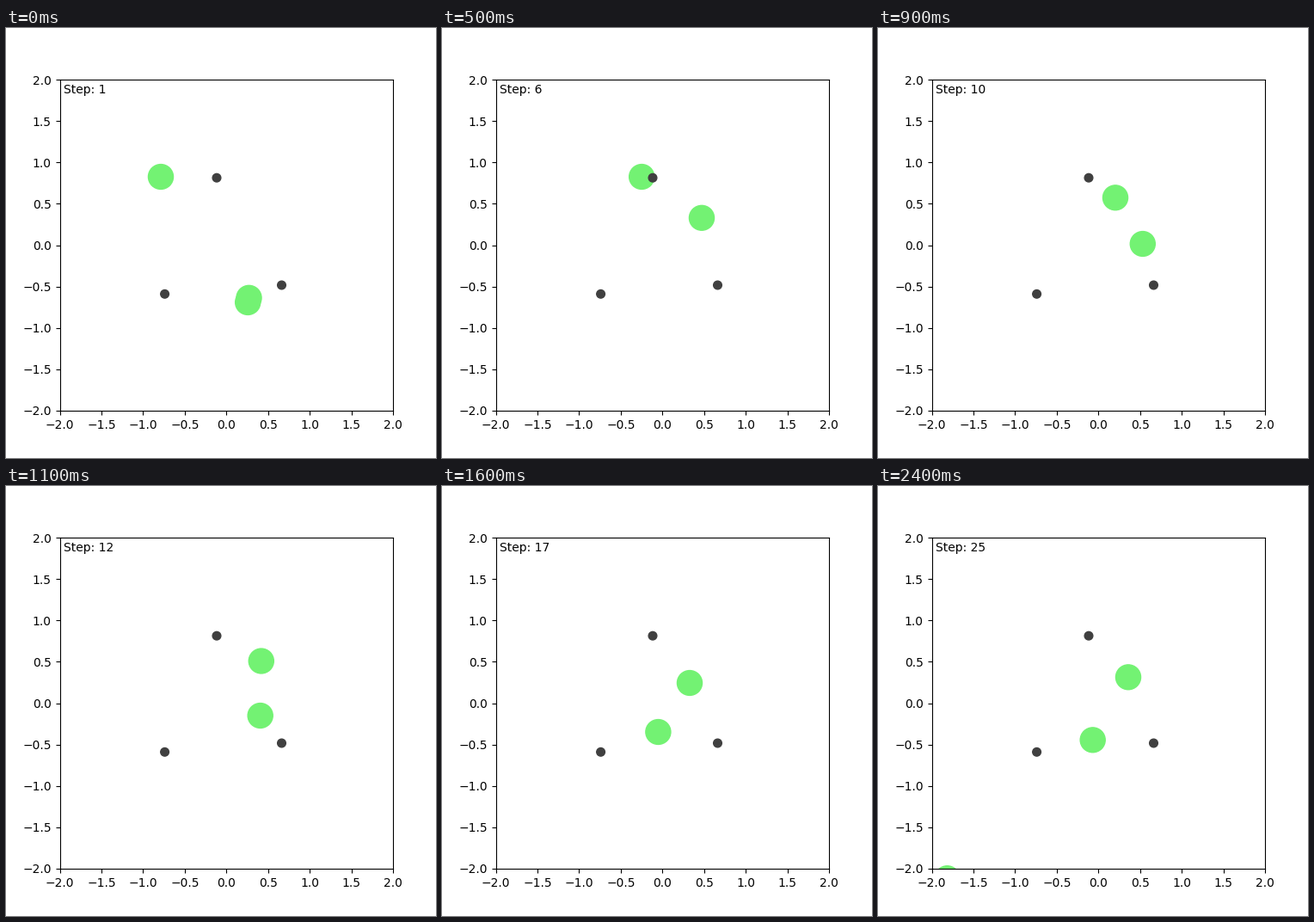
Write a matplotlib script that moves like this. It is 500 px wide and 500 px high and loops after 2.5 s.

```python
import numpy as np
import matplotlib.pyplot as plt
from matplotlib.animation import FuncAnimation

STEPS = 25
INTERVAL = 100
GREEN = (0.45, 0.95, 0.45)
GREY = (0.25, 0.25, 0.25)

# Waypoints: step, x, y in stage pixels (y down)
PATHS = [
    [(0, 180, 173), (5, 232.2, 173), (9, 276, 197.3), (11, 296.8, 203.5),
     (16, 288, 229), (20, 288, 230.2), (24, 291, 222.3)],
    [(0, 282.5, 313.8), (5, 302, 220.8), (9, 307.8, 251), (11, 295.7, 267),
     (16, 251.4, 286), (20, 243.6, 289), (24, 249.7, 295.3)],
    # leaves through the bottom edge and returns at the end
    [(0, 281.2, 319), (5, 250, 463), (12, 160, 600), (24, 80.5, 456.2)],
]
LANDMARKS = [(245, 174.2), (184.6, 309.3), (320.5, 299)]


def to_data(x, y):
    """Stage pixels to axis units."""
    return (x - 62.5) / 96.875 - 2, 2 - (y - 60) / 96.25


def end_slope(d0, d1, h0, h1):
    slope = d0 + (d0 - d1) * h0 / (h0 + h1)
    return slope if slope * d0 > 0 else 0


def slopes(keys, vals):
    """Shape-preserving slopes: zero at turning points, no overshoot."""
    h = np.diff(keys)
    d = np.diff(vals) / h
    m = np.zeros(len(keys))
    for i in range(1, len(d)):
        if d[i - 1] * d[i] > 0:
            w0, w1 = 2 * h[i] + h[i - 1], h[i] + 2 * h[i - 1]
            m[i] = (w0 + w1) / (w0 / d[i - 1] + w1 / d[i])
    m[0] = end_slope(d[0], d[1], h[0], h[1])
    m[-1] = end_slope(d[-1], d[-2], h[-1], h[-2])
    return m


def smooth(t, keys, vals):
    """Cubic Hermite curve through the waypoints."""
    m = slopes(keys, vals)
    i = min(np.searchsorted(keys, t, side="right"), len(keys) - 1) - 1
    h = keys[i + 1] - keys[i]
    s = (t - keys[i]) / h
    ease = s * s * (3 - 2 * s)
    return (vals[i] + (vals[i + 1] - vals[i]) * ease
            + h * s * (1 - s) * ((1 - s) * m[i] - s * m[i + 1]))


def position(path, t):
    keys, xs, ys = np.array(path, float).T
    return to_data(smooth(t, keys, xs), smooth(t, keys, ys))


def add_disc(center, radius, color):
    return ax.add_patch(plt.Circle(center, radius, color=color))


fig, ax = plt.subplots(figsize=(5, 5), dpi=100)
ax.set_xlim(-2, 2)
ax.set_ylim(-2, 2)

agents = [add_disc(position(p, 0), 0.15, GREEN) for p in PATHS]
for mark in LANDMARKS:
    add_disc(to_data(*mark), 0.05, GREY)
label = ax.text(-1.95, 1.95, "", va="top")


def update(step):
    for agent, path in zip(agents, PATHS):
        agent.center = position(path, step)
    label.set_text(f"Step: {step + 1}")
    return [*agents, label]


anim = FuncAnimation(fig, update, frames=STEPS, interval=INTERVAL,
                     repeat=True, repeat_delay=0)
plt.show()
```
